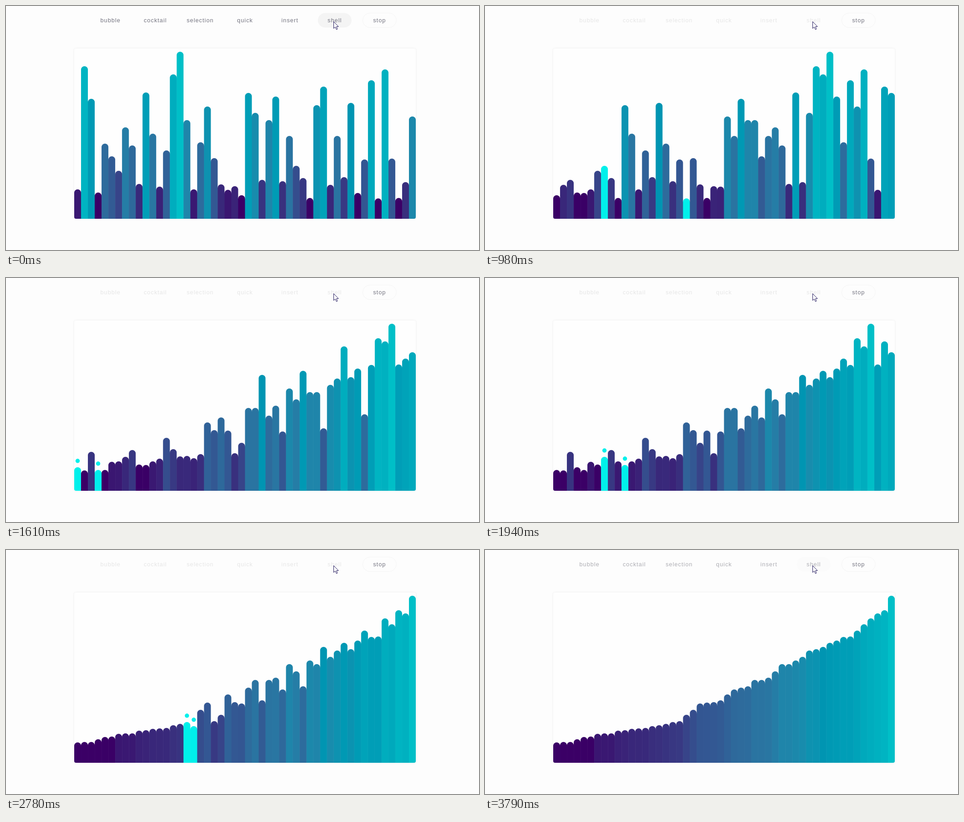
Write an HTML page with a canvas that moves like this. It is 1040x539 px and loops after 3840 ms.

```html
<!DOCTYPE html>
<html lang="en">
<head>
<meta charset="utf-8">
<title>Shell sort</title>
<style>
html, body { margin: 0; width: 100%; height: 100%; overflow: hidden; background: #fdfdfd; }
canvas { display: block; }
</style>
</head>
<body>
<canvas id="stage" width="1040" height="539"></canvas>
<script>
const ctx = document.getElementById('stage').getContext('2d');
const LOOP = 3840, START = 240, END = 3570, TICK = 46.9, SLOW_TICK = 110;
const LEFT = 150, PITCH = 15.02, ROOF = 94, FLOOR = 470, CAP = PITCH / 2;
const PAGE = 253, ACTIVE = 'rgb(0,240,235)';
const LABELS = ['bubble', 'cocktail', 'selection', 'quick', 'insert', 'shell', 'stop'];

// The unsorted input: top edge of each bar
const INPUT = [
  405, 133, 205, 412, 304, 332, 364, 268, 308, 393,
  191, 282, 399, 319, 151, 101, 252, 405, 301, 222,
  336, 394, 406, 398, 418, 192, 236, 384, 252, 200,
  387, 287, 353, 380, 424, 219, 178, 395, 287, 378,
  214, 413, 339, 164, 425, 140, 337, 424, 389, 244
];

// Sorting pace: [time, swaps made]
const PACE = [[START, 1.5], [990, 28.3], [1600, 59.8], [2303, 87.3], [3194, 127.8], [3520, 139.8]];

const clamp = v => Math.max(0, Math.min(1, v));
const mix = (a, b, k) => a + (b - a) * k;
const rgb = (...c) => `rgb(${c.map(Math.round)})`;
const gray = v => rgb(v, v, v);

// Purple through blue to cyan as the bar grows
function barColor(y) {
  const h = FLOOR - y;
  const red = 60 * Math.sqrt(clamp(1 - (h / 255) ** 2));
  const green = 191 * clamp((h - 58) / 311) ** 0.55;
  return rgb(red, green, 102 + 0.51 * green);
}

function swapPair(list, [i, j]) {
  [list[i], list[j]] = [list[j], list[i]];
}

// Every swap of a shell sort that finishes one chain before the next
function shellSwaps(list) {
  const a = [...list], swaps = [];
  for (let gap = a.length >> 1; gap > 0; gap >>= 1)
    for (let start = 0; start < gap; start++)
      for (let i = start + gap; i < a.length; i += gap)
        for (let j = i; j >= gap && a[j - gap] < a[j]; j -= gap) {
          swaps.push([j - gap, j]);
          swapPair(a, [j - gap, j]);
        }
  return swaps;
}
const swaps = shellSwaps(INPUT);

// The picture advances in even ticks, slower once the sort is done
function snap(t) {
  const late = t + 12;
  if (t < START) return 0;
  const [from, step] = late < END ? [START, TICK] : [END, SLOW_TICK];
  return from + step * Math.floor((late - from) / step);
}

function progress(t) {
  if (t < START) return -1;
  if (t > END - TICK / 2) return swaps.length;
  const next = PACE.findIndex(([time], i) => i > 0 && time >= t);
  const i = next < 0 ? PACE.length - 1 : next;
  const [t0, p0] = PACE[i - 1], [t1, p1] = PACE[i];
  return mix(p0, p1, clamp((t - t0) / (t1 - t0)));
}

function pill(cx) {
  ctx.beginPath();
  ctx.roundRect(cx - 37, 15.5, 74, 32, 16);
}

function drawMenu(fade) {
  ctx.font = '12.8px "Liberation Sans", Arial, sans-serif';
  ctx.letterSpacing = '1px';
  ctx.textAlign = 'center';
  ctx.lineWidth = 1;
  LABELS.forEach((label, i) => {
    const cx = 525.5 + (i - 3) * 98.6, dim = label === 'stop' ? 0 : fade;
    pill(cx);
    if (label === 'shell') {
      ctx.fillStyle = gray(mix(244, PAGE, clamp(fade * 1.6)));
      ctx.fill();
    }
    if (label === 'stop') {
      ctx.strokeStyle = gray(245);
      ctx.stroke();
    }
    ctx.fillStyle = rgb(mix(116, 230, dim), mix(116, 230, dim), mix(128, 230, dim));
    ctx.fillText(label, cx, 36);
  });
}

function drawCursor() {
  ctx.beginPath();
  [[0, 0], [0, 15], [3.5, 12], [6, 17.5], [8.3, 16.5], [6, 11.2], [10.5, 11]]
    .forEach(([x, y]) => ctx.lineTo(720.5 + x, 34.5 + y));
  ctx.closePath();
  ctx.fillStyle = '#fff';
  ctx.fill();
  ctx.strokeStyle = '#1c1259';
  ctx.stroke();
}

function panel() {
  ctx.beginPath();
  ctx.roundRect(LEFT, ROOF, PITCH * INPUT.length, FLOOR - ROOF, 4);
}

function drawBar(x, y, nextY) {
  ctx.beginPath();
  ctx.roundRect(x, y, PITCH, FLOOR - y, [CAP, CAP, 0, 0]);
  ctx.fill();
  // Close the hairline seam to the next bar
  const seam = Math.max(y, nextY) + CAP;
  ctx.fillRect(x + PITCH - 0.5, seam, 1, FLOOR - seam);
}

function drawChart(p) {
  const bars = [...INPUT], done = Math.max(0, Math.floor(p));
  swaps.slice(0, done).forEach(pair => swapPair(bars, pair));
  const pair = p >= 0 && done < swaps.length ? swaps[done] : [];

  ctx.save();
  ctx.shadowColor = 'rgba(0,0,0,0.07)';
  ctx.shadowBlur = 5;
  ctx.fillStyle = gray(254);
  panel();
  ctx.fill();
  ctx.restore();

  ctx.save();
  panel();
  ctx.clip();
  bars.forEach((y, i) => {
    ctx.fillStyle = pair.includes(i) ? ACTIVE : barColor(y);
    drawBar(LEFT + i * PITCH, y, bars[i + 1] ?? FLOOR);
  });
  ctx.restore();

  // Dots appear just before the two bars trade places
  if (p - done < 0.55) return;
  ctx.fillStyle = ACTIVE;
  for (const i of pair) {
    ctx.beginPath();
    ctx.arc(LEFT + (i + 0.5) * PITCH, bars[i] - 14, 4.7, 0, Math.PI * 2);
    ctx.fill();
  }
}

function draw(now) {
  const t = snap(now % LOOP);
  const fade = Math.min(clamp((t - 250) / 400), clamp((3990 - t) / 400));
  ctx.fillStyle = gray(PAGE);
  ctx.fillRect(0, 0, 1040, 539);
  drawMenu(fade);
  drawChart(progress(t));
  drawCursor();
}

const began = performance.now();
function tick() {
  draw(performance.now() - began);
  requestAnimationFrame(tick);
}
tick();
</script>
</body>
</html>
```
